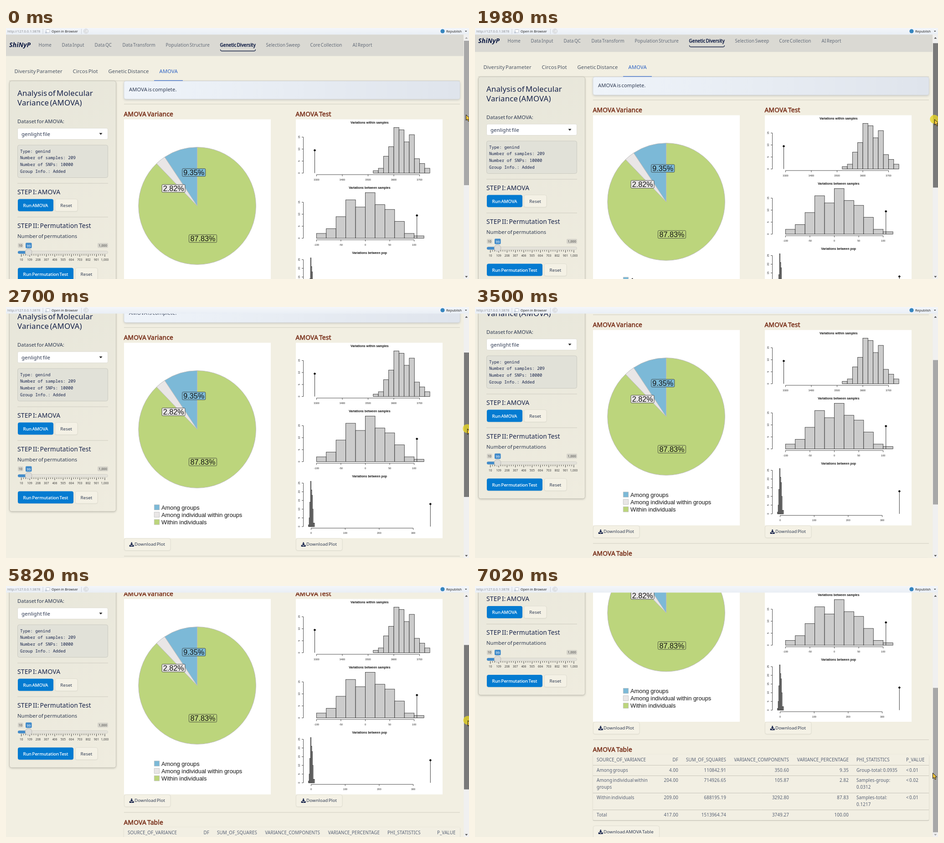
Animation, 1016 px wide and 551 px high, one loop 9530 ms. Source, as an HTML page with a canvas:

```html
<!DOCTYPE html>
<html lang="en">
<head>
<meta charset="utf-8">
<title>AMOVA walkthrough</title>
<style>
html, body { margin: 0; width: 100%; height: 100%; overflow: hidden; background: #f2efe2; }
canvas { display: block; }
</style>
</head>
<body>
<canvas id="stage" width="1016" height="551"></canvas>
<script>
const ctx = document.getElementById('stage').getContext('2d');
const LOOP = 9530;
const SANS = '"Noto Sans", "Open Sans", sans-serif';
const UI = '"Noto Sans", sans-serif';
const ARIAL = '"Liberation Sans", Arial, sans-serif';
const MONO = '"Noto Sans Mono", monospace';
const NAVY = '#16224a', INK = '#2c3850', MUTED = '#566074', RUST = '#772d17';
const BLUE = '#7cb9d7', PALE = '#e9e6e6', GREEN = '#bcd57c';
const PAGE_SHIFT = -0.5, MAX_SCROLL = 331.5;

// ---------- timeline: time, scroll, cursor x, cursor y, halo, dragging ----------
const states = [[0, 0, 1009, 190, 0, 0], [1470, 0, 1009, 190, 1, 1]];
[3, 9, 17, 27, 40, 54, 71, 88, 106, 122].forEach((s, i) =>
  states.push([1790 + i * 100, s, i < 6 ? 1008 : 1008 + (i - 5), 195 + s * 0.59, 1, 1]));
states.push([2810, 139, 1015, 275, 1, 1], [2900, 150, 1030, 281, 0, 1],
  [3500, 150, 1030, 281, 0, 0], [4820, 150, 1015, 280, 0, 0], [5510, 150, 1015, 281, 1, 1]);
[158, 172, 190, 211, 232, 252, 276, 299, 319, MAX_SCROLL].forEach((s, i) =>
  states.push([5710 + i * 102, s, i < 6 ? 1013 : 1013 - (i - 5) * 2.25,
    i < 6 ? 281 + (s - 150) * 0.63 : 345 + (i - 5) * 16.25, 1, 1]));
states.push([6730, MAX_SCROLL, 1004, 410, 0.5, 1], [6830, MAX_SCROLL, 1004, 410, 0, 1],
  [7020, MAX_SCROLL, 1004, 410, 0, 0]);

// ---------- helpers ----------
function text(s, x, y, size, color, o = {}) {
  const family = o.family || SANS;
  const tight = family === SANS;
  ctx.font = `${o.style || ''} ${size}px ${family}`;
  ctx.wordSpacing = tight ? `${-0.13 * size}px` : '0px';
  ctx.letterSpacing = tight ? `${0.01 * size}px` : '0px';
  ctx.textAlign = o.align || 'left';
  ctx.fillStyle = color;
  ctx.fillText(s, x, y);
  if (o.heavy) {
    ctx.strokeStyle = color;
    ctx.lineWidth = o.heavy;
    ctx.strokeText(s, x, y);
  }
}

function line(x1, y1, x2, y2, color, w = 1) {
  ctx.beginPath();
  ctx.moveTo(x1, y1);
  ctx.lineTo(x2, y2);
  ctx.strokeStyle = color;
  ctx.lineWidth = w;
  ctx.stroke();
}

function box(x1, y1, x2, y2, fill, border, r = 0, shadow, blur = 4) {
  ctx.save();
  ctx.beginPath();
  ctx.roundRect(x1, y1, x2 - x1, y2 - y1, r);
  if (shadow) {
    ctx.shadowColor = shadow;
    ctx.shadowBlur = blur;
    ctx.shadowOffsetY = blur / 3;
  }
  ctx.fillStyle = fill;
  ctx.fill();
  ctx.restore();
  if (border) {
    ctx.strokeStyle = border;
    ctx.lineWidth = 0.8;
    ctx.stroke();
  }
}

function poly(points, fill, stroke, w = 1) {
  ctx.beginPath();
  points.forEach(([x, y]) => ctx.lineTo(x, y));
  ctx.closePath();
  if (fill) { ctx.fillStyle = fill; ctx.fill(); }
  if (stroke) { ctx.strokeStyle = stroke; ctx.lineWidth = w; ctx.stroke(); }
}

function disc(x, y, r, fill, stroke) {
  ctx.beginPath();
  ctx.arc(x, y, r, 0, 7);
  ctx.fillStyle = fill;
  ctx.fill();
  if (stroke) { ctx.strokeStyle = stroke; ctx.lineWidth = 0.8; ctx.stroke(); }
}

function blend(x1, y1, x2, y2, from, to) {
  const g = ctx.createLinearGradient(x1, y1, x2, y2);
  g.addColorStop(0, from);
  g.addColorStop(1, to);
  return g;
}

const rule = (x1, x2, y) => line(x1, y + 0.5, x2, y + 0.5, '#cbc8bd', 0.9);

function button(label, x1, x2, y, primary) {
  box(x1, y, x2, y + 26.8, primary ? '#047bd1' : '#f4f1e5', primary ? null : '#dedbcf', 4, 'rgba(60,60,50,.12)', 2);
  text(label, (x1 + x2) / 2, y + 17, 9.8, primary ? '#fff' : INK, { align: 'center', heavy: primary ? 0.25 : 0 });
}

function download(label, x, y, w) {
  box(x + 0.5, y + 0.5, x + w, y + 27, '#f4f1e5', '#dedbcf', 4, 'rgba(60,60,50,.12)', 2);
  const cx = x + 16.7, cy = y + 14;
  ctx.fillStyle = NAVY;
  ctx.fillRect(cx - 1.2, cy - 5, 2.4, 4);
  poly([[cx - 3.4, cy - 1.4], [cx + 3.4, cy - 1.4], [cx, cy + 2.2]], NAVY);
  poly([[cx - 5, cy + 1], [cx - 2.6, cy + 1], [cx, cy + 3.4], [cx + 2.6, cy + 1], [cx + 5, cy + 1],
    [cx + 5, cy + 4.6], [cx - 5, cy + 4.6]], NAVY);
  text(label, x + 23, y + 16.8, 9.8, INK);
}

// ---------- page parts ----------
function navbar() {
  ctx.fillStyle = '#dad9d3';
  ctx.fillRect(0, 0, 1004, 62);
  text('ShiNyP', 7, 42.5, 14, '#0d1a42', { style: 'italic bold' });
  const items = [['Home', 72], ['Data Input', 123], ['Data QC', 195], ['Data Transform', 256],
    ['Population Structure', 351], ['Genetic Diversity', 470], ['Selection Sweep', 571],
    ['Core Collection', 668], ['AI Report', 761]];
  for (const [s, x] of items) {
    const on = x === 470;
    text(s, x - 0.5, 41, 9.86, on ? '#101d45' : '#626a77', { heavy: on ? 0.5 : 0 });
  }
  ctx.beginPath();
  ctx.moveTo(470.5, 47.5);
  ctx.quadraticCurveTo(470.5, 51, 474, 51);
  ctx.lineTo(544, 51);
  ctx.quadraticCurveTo(547.5, 51, 547.5, 47.5);
  ctx.strokeStyle = '#1b2748';
  ctx.lineWidth = 1.3;
  ctx.stroke();
}

function tabs() {
  [['Diversity Parameter', 19], ['Circos Plot', 147], ['Genetic Distance', 225]]
    .forEach(([s, x]) => text(s, x - 0.6, 99, 11.27, '#4b5564'));
  text('AMOVA', 336.6, 99, 11.27, '#2d62c4');
  rule(7, 996, 116);
  line(325, 116, 388, 116, '#3a6fd0', 1.4);
}

function slider() {
  box(26, 472.5, 37.5, 483, '#d5d3ca', null, 2);
  text('10', 31.7, 480.4, 7, '#444', { align: 'center' });
  box(201, 472.5, 224, 483, '#d5d3ca', null, 2);
  text('1,000', 212.6, 480.4, 7, '#444', { align: 'center' });
  box(43, 472, 56.5, 484, '#428bca', null, 2);
  text('99', 49.8, 481, 7.6, '#fff', { align: 'center' });
  box(26, 490, 223.5, 496, '#e4e2da', '#cfcdc5', 3);
  box(26, 490, 49, 496, '#428bca', null, 3);
  const gap = 18.32;
  for (let i = 0; i <= 40; i++) {
    const x = 33.7 + i * gap / 4;
    line(x, 497, x, i % 4 ? 500 : 502.5, '#2c2c2c', 0.9);
  }
  for (let i = 0; i <= 10; i++)
    text((10 + 99 * i).toLocaleString('en-US'), 33.7 + i * gap, 511, 6.4, '#3a3a3a', { align: 'center' });
  disc(49.5, 492.5, 7.4, '#dddcd8', '#b3b2ae');
}

function sidebar() {
  box(7.5, 116.5, 241.5, 571.3, blend(7, 116, 242, 572, '#e7e6da', '#efecdf'), '#bfbdb2', 5, 'rgba(50,50,40,.25)', 4);
  text('Analysis of Molecular', 25, 149.3, 16.8, NAVY);
  text('Variance (AMOVA)', 25, 170, 16.8, NAVY);
  text('Dataset for AMOVA:', 25, 209.5, 11.2, INK);
  box(25.5, 220.5, 223.5, 245, '#fff', '#d9d7cd', 3);
  text('genlight file', 34, 237, 11.27, INK);
  poly([[204.5, 231], [211.5, 231], [208, 235]], '#222');
  box(25.5, 257.5, 223.5, 329, '#e1e1d8', '#c4c4bb', 4);
  ['Type: genind', 'Number of samples: 209', 'Number of SNPs: 10000', 'Group Info.: Added']
    .forEach((s, i) => text(s, 31, 274 + i * 14.95, 9.24, NAVY, { family: MONO }));
  rule(25, 224, 341);
  text('STEP I: AMOVA', 25, 365.2, 13.9, NAVY);
  button('Run AMOVA', 26, 104, 376, true);
  button('Reset', 107.5, 157, 376);
  rule(25, 224, 415);
  text('STEP II: Permutation Test', 25, 439.2, 13.9, NAVY);
  text('Number of permutations', 25, 461.3, 11.2, INK);
  slider();
  button('Run Permutation Test', 26, 148, 527, true);
  button('Reset', 152, 201, 527);
}

function pie() {
  ctx.fillStyle = '#fff';
  ctx.fillRect(259, 201, 322, 429);
  const cx = 419.6, cy = 391, r = 128.8;
  let a = -Math.PI / 2;
  [[0.8783, GREEN], [0.0282, PALE], [0.0935, BLUE]].forEach(([part, fill]) => {
    const b = a + part * 2 * Math.PI;
    ctx.beginPath();
    ctx.moveTo(cx, cy);
    ctx.arc(cx, cy, r, a, b);
    ctx.closePath();
    ctx.fillStyle = fill;
    ctx.fill();
    ctx.strokeStyle = '#bcbcbc';
    ctx.lineWidth = 1;
    ctx.stroke();
    a = b;
  });
  [['9.35%', 412.3, 317.7, 51, BLUE], ['2.82%', 367.6, 352.7, 51, PALE], ['87.83%', 432, 462.7, 61, GREEN]]
    .forEach(([s, x, y, w, fill]) => {
      box(x - w / 2, y - 8.5, x + w / 2, y + 8.5, fill, '#333', 2);
      text(s, x, y + 5.8, 16.2, '#111', { family: ARIAL, align: 'center' });
    });
  [['Among groups', BLUE], ['Among individual within groups', PALE], ['Within individuals', GREEN]]
    .forEach(([s, fill], i) => {
      const y = 562.3 + i * 16.2;
      box(325.3, y - 5.8, 336.7, y + 5.6, fill, '#bcbcbc');
      text(s, 341, y + 4.7, 12.87, '#111', { family: ARIAL });
    });
}

function histogram(h) {
  const X = v => h.x0 + v * h.sx, Y = n => h.base - n * h.sy, K = '#222';
  text(h.title, 797.8, h.top, 6.85, '#111', { family: ARIAL, style: 'bold', align: 'center' });
  h.counts.forEach((n, i) => {
    const x = X(h.from + i * h.bin);
    ctx.fillStyle = '#cccccc';
    ctx.fillRect(x, Y(n), h.bin * h.sx, n * h.sy);
    ctx.strokeStyle = K;
    ctx.lineWidth = 0.8;
    ctx.strokeRect(x, Y(n), h.bin * h.sx, n * h.sy);
  });
  line(652.5, h.base, 652.5, Y(h.yMax), K, 0.8);
  for (let n = 0; n <= h.yMax; n += 5) {
    line(649, Y(n), 652.5, Y(n), K, 0.8);
    ctx.save();
    ctx.translate(645, Y(n));
    ctx.rotate(-Math.PI / 2);
    text(n, 0, 0, 5.6, K, { family: ARIAL, align: 'center' });
    ctx.restore();
  }
  const ax = h.base + 3.4, t = h.xTicks;
  line(X(t[0]), ax, X(t[1]), ax, K, 0.8);
  for (let v = t[0]; v <= t[1]; v += t[2]) {
    line(X(v), ax, X(v), ax + 3.6, K, 0.8);
    text(v, X(v), h.base + 16, 5.6, K, { family: ARIAL, align: 'center' });
  }
  line(h.ox, h.base, h.ox, h.oy, K, 0.9);
  poly([[h.ox, h.oy - 2.8], [h.ox + 2.8, h.oy], [h.ox, h.oy + 2.8], [h.ox - 2.8, h.oy]], '#000');
}

const charts = [
  { title: 'Variations within samples', top: 210.5, base: 319, sy: 5.27, yMax: 15, x0: 681.5 - 3300 * 0.565,
    sx: 0.565, xTicks: [3300, 3700, 100], from: 3520, bin: 20, counts: [1, 2, 7, 11, 19, 18, 13, 16, 6, 4, 2],
    ox: 677.5, oy: 269 },
  { title: 'Variations between samples', top: 353.8, base: 462, sy: 5.27, yMax: 15, x0: 788.5,
    sx: 1.072, xTicks: [-100, 100, 50], from: -100, bin: 20, counts: [2, 4, 9, 16, 13, 19, 14, 12, 7, 2, 1],
    ox: 901.7, oy: 412 },
  { title: 'Variations between pop', top: 496.3, base: 604.5, sy: 3.82, yMax: 25, x0: 669.6,
    sx: 0.7465, xTicks: [0, 300, 100], from: -8, bin: 2, counts: [1, 5, 14, 26, 21, 18, 10, 2, 2],
    ox: 931.3, oy: 555 }
];

function table() {
  box(259, 702, 996, 846, '#f2efe3', null, 3, 'rgba(50,50,40,.2)', 3);
  const cols = [267, 446, 551, 689, 820, 837, 946];
  const row = (cells, y, size) => cells.forEach((s, i) =>
    text(s, cols[i], y, size, MUTED, { align: i > 0 && i < 5 ? 'right' : 'left' }));
  row(['SOURCE_OF_VARIANCE', 'DF', 'SUM_OF_SQUARES', 'VARIANCE_COMPONENTS', 'VARIANCE_PERCENTAGE',
    'PHI_STATISTICS', 'P_VALUE'], 717.2, 9.85);
  row(['Among groups', '4.00', '110842.91', '350.60', '9.35', 'Group-total: 0.0935', '< 0.01'], 740, 9.86);
  row(['Among individual within', '204.00', '714926.65', '105.87', '2.82', 'Samples-group:', '< 0.02'], 762.3, 9.86);
  row(['groups', '', '', '', '', '0.0312'], 777.3, 9.86);
  row(['Within individuals', '209.00', '688195.19', '3292.80', '87.83', 'Samples-total:', '< 0.01'], 800.3, 9.86);
  row(['', '', '', '', '', '0.1217'], 815.3, 9.86);
  row(['Total', '417.00', '1513964.74', '3749.27', '100.00'], 838, 9.86);
  [725, 748, 786, 823, 846].forEach(y => line(259, y + 0.5, 996, y + 0.5, '#c3c1b6', 0.9));
}

function content() {
  box(259, 117, 996, 156.5, blend(259, 117, 996, 157, '#eff4fa', '#dfe4ec'), '#d5dae0', 4, 'rgba(50,60,80,.25)', 5);
  text('AMOVA is complete.', 270, 139.3, 11.2, INK);
  rule(259, 996, 167);
  text('AMOVA Variance', 258.6, 194.4, 13.85, RUST, { heavy: 0.5 });
  text('AMOVA Test', 635.6, 194.4, 13.85, RUST, { heavy: 0.5 });
  pie();
  ctx.fillStyle = '#fff';
  ctx.fillRect(636, 201, 322, 429);
  charts.forEach(histogram);
  download('Download Plot', 259, 630, 102);
  download('Download Plot', 636, 630, 102);
  rule(259, 996, 669);
  text('AMOVA Table', 258.6, 696, 13.85, RUST, { heavy: 0.5 });
  table();
  download('Download AMOVA Table', 259, 858, 145.5);
}

// ---------- window frame ----------
function toolbar() {
  ctx.fillStyle = blend(0, 0, 0, 15, '#f3f6fa', '#e9eef5');
  ctx.fillRect(0, 0, 1016, 14.5);
  text('http://127.0.0.1:3878', 3, 10, 7.4, '#8a8d92', { family: UI });
  line(81, 2, 81, 13, '#cdd2d9');
  box(88, 3.5, 96, 10, '#fff', '#a9b2bf', 1);
  poly([[86, 8], [90, 8], [90, 11.5], [86, 11.5]], '#c4ccd8');
  text('Open in Browser', 100, 10.4, 7.38, '#222', { family: UI });
  line(165.5, 2, 165.5, 13, '#cdd2d9');
  disc(175.5, 7, 5, '#eceef0', '#c2c5c9');
  ctx.beginPath();
  ctx.arc(175.5, 7, 2.5, 0.4, 5.4);
  ctx.strokeStyle = '#b8bbbf';
  ctx.stroke();
  disc(958, 7, 4.6, '#3585bf');
  text('Republish', 966, 10.4, 7.35, '#222', { family: UI });
  poly([[1007, 6], [1011.6, 6], [1009.3, 8.6]], '#444');
}

function scrollbar(scroll, dragging) {
  ctx.fillStyle = '#f0f0f0';
  ctx.fillRect(1004.5, 14.5, 11.5, 537);
  const up = scroll > 0 ? '#505050' : '#a5a5a5', down = scroll < MAX_SCROLL ? '#505050' : '#a5a5a5';
  poly([[1007.3, 23.5], [1013.3, 23.5], [1010.3, 20]], up);
  poly([[1007.3, 544.5], [1013.3, 544.5], [1010.3, 548]], down);
  ctx.fillStyle = dragging ? '#797979' : '#a8a8a8';
  ctx.fillRect(1005, 28 + scroll * 0.59, 11, 317);
}

function cursor(x, y, halo) {
  if (halo) disc(x, y, 9.7, `rgba(230,212,36,${0.8 * halo})`);
  const shape = [[0, 0], [0, 12.2], [2.9, 9.7], [5, 14.3], [7.2, 13.3], [5.2, 8.9], [9, 8.7]];
  poly(shape.map(([dx, dy]) => [x + 0.5 + dx, y + 0.5 + dy]), '#f8c93e', '#111', 1);
}

function draw(now) {
  const t = now % LOOP;
  const [, scroll, x, y, halo, dragging] = states.findLast(s => s[0] <= t);
  ctx.fillStyle = '#f2efe2';
  ctx.fillRect(0, 0, 1016, 551);
  ctx.save();
  ctx.translate(0, PAGE_SHIFT - scroll);
  navbar();
  tabs();
  sidebar();
  content();
  ctx.restore();
  toolbar();
  scrollbar(scroll, dragging);
  cursor(x, y, halo);
  requestAnimationFrame(draw);
}
requestAnimationFrame(draw);
</script>
</body>
</html>
```
